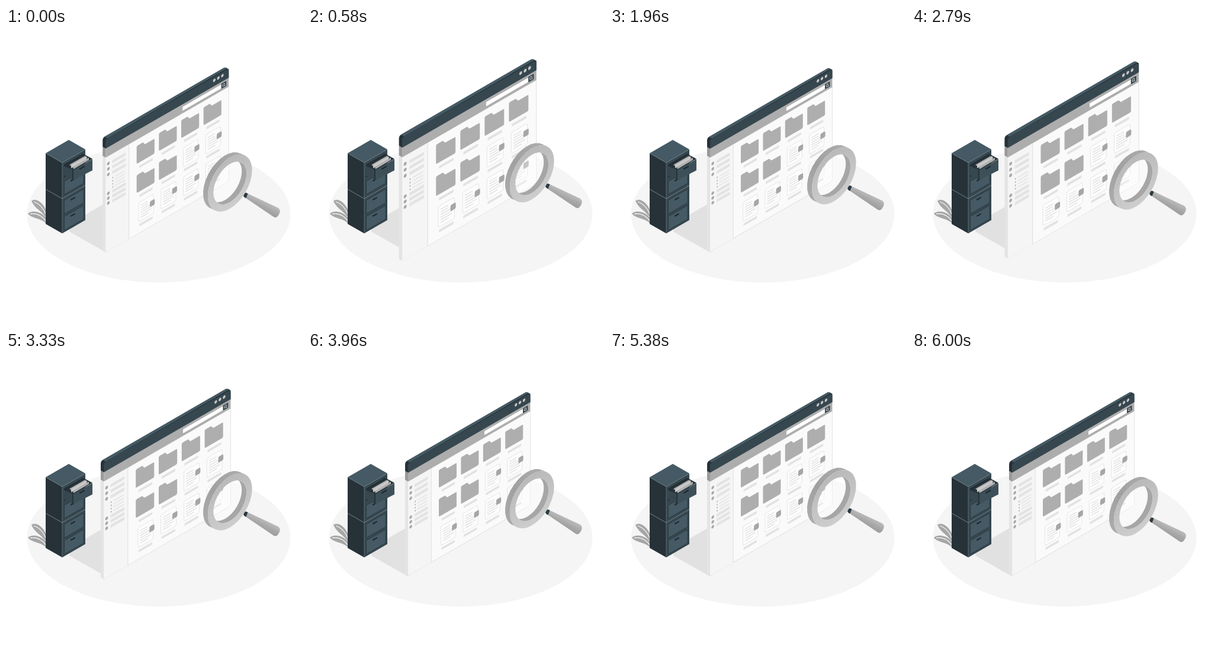
These frames come from a looping animation (500x500 px, 6.04 s). An HTML page:

```html
<!DOCTYPE html>
<html lang="en">
<head>
<meta charset="utf-8">
<title>Searching files</title>
<style>
  html, body { margin: 0; width: 100%; height: 100%; overflow: hidden; background: #fff; }
  svg { display: block; width: 100vw; height: 100vh; }
</style>
</head>
<body>
<svg viewBox="0 0 500 500" xmlns="http://www.w3.org/2000/svg">
  <defs>
    <linearGradient id="wall" x1="0" y1="1" x2="1" y2="0">
      <stop offset="0" stop-color="#adadad"/>
      <stop offset=".45" stop-color="#a0a0a0"/>
      <stop offset="1" stop-color="#adadad"/>
    </linearGradient>
    <linearGradient id="rim" x1="0" y1="0" x2="0" y2="1">
      <stop offset="0" stop-color="#b9b9b9"/>
      <stop offset="1" stop-color="#cdcdcd"/>
    </linearGradient>
    <linearGradient id="grip" gradientUnits="userSpaceOnUse" x1="436" y1="295" x2="429" y2="309">
      <stop offset="0" stop-color="#b8b8b8"/>
      <stop offset=".45" stop-color="#a8a8a8"/>
      <stop offset="1" stop-color="#9c9c9c"/>
    </linearGradient>
    <clipPath id="hole"><ellipse id="holeShape"/></clipPath>
  </defs>

  <ellipse cx="258" cy="314" rx="222.5" ry="116" fill="#f5f5f5"/>
  <path d="M169 379L107 344V331L164 298L230 336Z" fill="#e1e1e1"/>

  <g id="plant" fill="#a6a6a6">
    <path d="M43 292C51 286 66 296 70 316L66 318C58 308 47 303 43 292Z"/>
    <path d="M37 313.500C43 307 60 309 69 322V331C60 321 43 322 37 313.500Z"/>
    <path d="M47 293.500C57 297 64 306 68 316M41 314C52 312 62 318 69 328" fill="none" stroke="#f5f5f5" stroke-width="1.300"/>
  </g>

  <g id="cabinet">
    <path d="M66.500 331.500L95 347.800" fill="none" stroke="#fafafa" stroke-width=".8"/>
    <path d="M67 272L95 288V347L67 331Z" fill="#263238"/>
    <path d="M95 288L134 265.500V324.500L95 347Z" fill="#37474f"/>
    <path d="M67 211.500L95 227.500V288L67 272Z" fill="#263238"/>
    <path d="M95 227.500L134 205V265.500L95 288Z" fill="#37474f"/>
    <path d="M67 211.500L106 189L134 205L95 227.500Z" fill="#455a64"/>
    <path d="M67 211.500L95 227.500L134 205M95 227.500V347M67 272.500L95 288.500L134 266" fill="none" stroke="#71828a" stroke-width=".7"/>
    <g id="drawers" fill="#455a64" stroke="#263238" stroke-width=".7"></g>
    <path d="M98 231L131 212V233L98 252Z" fill="#1f2a30"/>
    <path d="M98 233L114 240V257L98 249Z" fill="#37474f"/>
    <path d="M98 233L114 240L146 221L131 213Z" fill="#263238"/>
    <path d="M107 231L133 216L138 219.500L112 235Z" fill="#a6a6a6"/>
    <path d="M110 231L136 216.500V222L110 237Z" fill="#c9c9c9"/>
    <path d="M113 234.500L140 219V223L114 238.500Z" fill="#b0b0b0"/>
    <path d="M114 240L146 221.500V240.500L114 257Z" fill="#3d5059"/>
    <path d="M112 239L114 240V257L112 256Z" fill="#263238"/>
    <path d="M125 238L132 234" stroke="#1f2a30" stroke-width="2.200" stroke-linecap="round"/>
  </g>

  <g id="browser">
    <path d="M164 217V375L169 378V219Z" fill="#e4e4e4"/>
    <path d="M164 201V216L169 219V204Z" fill="#999"/>
    <path d="M164 201V190Q164 186 167 184L367.500 68.200Q369.500 67 375.500 70.500V85L169 204Z" fill="#263238"/>
    <path d="M167 184L367.500 68.200Q369.500 67 373 69L172 186.500Z" fill="#455a64"/>
    <g id="face" transform="matrix(1 -.577 0 1 169 0)"></g>
  </g>

  <g id="magnifier"></g>
</svg>

<script>
const NS = "http://www.w3.org/2000/svg";
const find = id => document.getElementById(id);

function add(parent, tag, attrs) {
  const node = document.createElementNS(NS, tag);
  for (const key in attrs) node.setAttribute(key, attrs[key]);
  return parent.appendChild(node);
}

const face = find("face");
const path = (parent, d, fill, extra) => add(parent, "path", { d, fill, ...extra });
const rect = (x, y, width, height, rx, fill, extra) =>
  add(face, "rect", { x, y, width, height, rx, fill, ...extra });
const disc = (cx, cy, r, fill) =>
  add(face, "ellipse", { cx, cy, rx: r, ry: r * 1.155, fill });

function buildDrawers() {
  for (const y of [259, 291, 318.5]) {
    const h = y < 270 ? 22 : 23;
    path(find("drawers"), `M98.500 ${y}l32.500 -18.700v${h}l-32.500 18.700Z`);
    path(find("drawers"), `M110 ${y - 1}l6 -3.400`, "none",
      { stroke: "#1f2a30", "stroke-width": 2.2, "stroke-linecap": "round" });
  }
}

function buildChrome() {
  path(face, "M0 219H206.500V373Q206.500 378 201 378H0Z", "#fafafa", { stroke: "#dedede", "stroke-width": .8 });
  rect(0, 219, 39, 159, 0, "#f5f5f5");
  rect(38.7, 219, .9, 159, 0, "#dcdcdc");
  rect(0, 203, 206.5, 16, 0, "#adadad");
  path(face, "M0 204V192.500Q0 188.500 4 188.500H202Q206.500 188.500 206.500 192.500V204Z", "#37474f");
  for (const x of [182.3, 189.1, 195.9]) disc(x, 194.5, 2.2, "#c7c7c7");
  rect(129, 208.3, 66, 6.5, 1, "#fff");
  rect(194, 207, 8.5, 8.6, 1, "#37474f");
  add(face, "ellipse", { cx: 198, cy: 211, rx: 1.7, ry: 2, fill: "none", stroke: "#e0e0e0", "stroke-width": .8 });
  path(face, "M199.200 212.600l1.300 1.500", "none", { stroke: "#e0e0e0", "stroke-width": .8 });
}

function buildSidebar() {
  for (const y of [231.5, 240.5, 249.8, 281.5, 289.5, 297.7]) {
    disc(4.6, y, 2.3, "#a8a8a8");
    rect(11, y - 1.8, 22.5, 5, 1.2, "#e3e3e3");
  }
  for (let i = 0; i < 4; i++) {
    const y = 259 + i * 5.2;
    rect(11.3, y - .6, 1.6, 2.2, .5, "#a8a8a8");
    rect(15.5, y - .5, 17, 2, .5, "#e6e6e6");
  }
}

function folder(x, y) {
  path(face, `M${x} ${y + 6}V${y + 2}q0 -2 2 -2h8.500l3.500 5h14.500q1.500 0 1.500 1.500V${y + 28}q0 2 -2 2H${x + 2}q-2 0 -2 -2Z`, "#aeaeae");
}

function sheet(x, y) {
  rect(x + 3.5, y - 1, 25, 32.5, 3, "#fcfcfc", { stroke: "#e4e4e4", "stroke-width": .9 });
  for (let i = 0; i < 6; i++)
    rect(x + 7, y + 5 + i * 4, i < 2 ? 12 : i === 5 ? 13 : 18, 1.3, .5, "#dedede");
  rect(x + 22.2, y + 8, 8.2, 9.5, 2, "#a6a6a6");
}

function buildFiles() {
  for (let row = 0; row < 3; row++)
    for (let col = 0; col < 4; col++) {
      const x = 52 + col * 37.4, y = 229.5 + row * 49;
      (row === 0 || row === 1 && col < 2 ? folder : sheet)(x, y);
      rect(x + 4.5, y + 35.5, 22.5, 4, 1, "#e2e2e2");
    }
}

// A circle lying in the plane of the browser window, seen isometrically.
const inPlane = ([x, y]) => `matrix(1 -.577 0 1 ${x} ${y})`;
const planeCircle = (centre, r) =>
  ({ rx: r, ry: r * 1.155, transform: inPlane(centre) });

function ringPath(outer, inner) {
  const loop = r => `M${-r} 0A${r} ${r * 1.155} 0 1 1 ${r} 0A${r} ${r * 1.155} 0 1 1 ${-r} 0Z`;
  return loop(outer) + loop(inner);
}

function buildMagnifier() {
  const g = find("magnifier");
  const front = [378.3, 263], back = [370.3, 259.2];
  const outer = 37.4, inner = 28;
  const hole = planeCircle(front, inner);
  for (const key in hole) find("holeShape").setAttribute(key, hole[key]);

  path(g, "M408 280.500L459 304.500Q464 307.500 462.500 312.500Q460.500 318.500 456.500 320.800Q454.500 321.500 452 320L405 288.300Z", "url(#grip)");
  path(g, "M403 280Q406 278.500 408.500 281L405.500 288.500Q402 287.500 401 284.500Z", "#2b3a42");

  const inside = add(g, "g", { "clip-path": "url(#hole)" });
  add(inside, "ellipse", { ...planeCircle(back, inner), fill: "#fff", "fill-opacity": .35 });
  path(inside, ringPath(46, inner), "#a6a6a6", { transform: inPlane(back), "fill-rule": "evenodd" });

  // The rim's outer wall is swept between its back and front circles.
  const steps = 16;
  let d = "";
  const sweep = (centre, from, to) => {
    for (let i = 0; i <= steps; i++) {
      const a = mix(from, to, i / steps);
      const x = outer * Math.cos(a), y = outer * 1.155 * Math.sin(a) - .577 * x;
      d += `${d ? "L" : "M"}${(centre[0] + x).toFixed(2)} ${(centre[1] + y).toFixed(2)}`;
    }
  };
  const start = Math.PI * .7, end = Math.PI * 1.75;
  sweep(back, start, end);
  sweep(front, end, start);
  path(g, d + "Z", "url(#wall)");
  path(g, ringPath(outer, inner), "url(#rim)", { transform: inPlane(front), "fill-rule": "evenodd" });
}

const CYCLE = 6040, RATE = 24;
const mix = (a, b, k) => a + (b - a) * k;

// Double heartbeat: [seconds, scale] joined by straight segments.
const beat = [[0, 1], [.6, 1.1], [1.8, 1], [2.4, 1], [3, 1.1], [3.6, 1], [6, 1]];

function beatScale(s) {
  const i = Math.max(1, beat.findIndex(key => key[0] >= s));
  const [t0, v0] = beat[i - 1], [t1, v1] = beat[i];
  return mix(v0, v1, (s - t0) / (t1 - t0));
}

function floatOffset(s) {
  const k = s % 1.5 / .75;
  return -20 * (k < 1 ? k : 2 - k);
}

function render(ms) {
  const tick = Math.floor((ms % CYCLE + 5) * RATE / 1000);
  const s = Math.min((tick + 1) / RATE, 6);
  find("browser").setAttribute("transform",
    `translate(269.750 223) scale(${beatScale(s)}) translate(-269.750 -223)`);
  find("magnifier").setAttribute("transform", `translate(0 ${floatOffset(s)})`);
}

buildDrawers();
buildChrome();
buildSidebar();
buildFiles();
buildMagnifier();

const begin = performance.now();
function loop() {
  render(performance.now() - begin);
  requestAnimationFrame(loop);
}
render(0);
requestAnimationFrame(loop);
</script>
</body>
</html>
```
